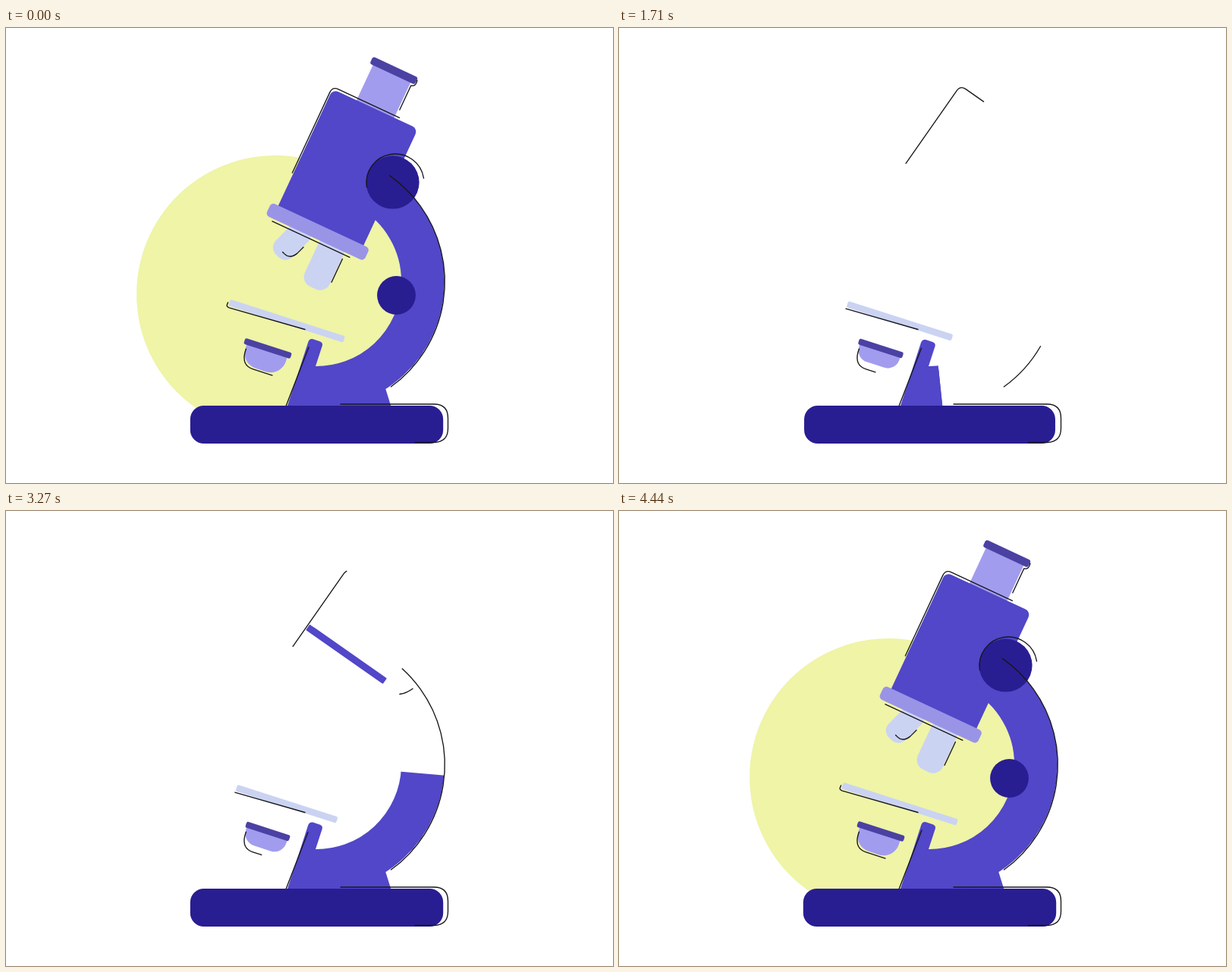
An HTML page with a canvas that plays this animation: 800x600 px, repeating every 5490 ms.

```html
<!DOCTYPE html>
<html lang="en">
<head>
<meta charset="utf-8">
<title>Microscope</title>
<style>
  html, body { margin: 0; height: 100%; overflow: hidden; background: #fff; }
  canvas { display: block; }
</style>
</head>
<body>
<canvas width="800" height="600"></canvas>
<script>
const ctx = document.querySelector('canvas').getContext('2d');
const LOOP = 5490, STEP = 30, BLANK = 2300;
const INDIGO = '#5147c8', NAVY = '#291d92', LILAC = '#a29cef',
      PLUM = '#4b41a3', COLLAR = '#9a94e6', PALE = '#cbd3f2', LIME = '#eff4a7';
const RAD = Math.PI / 180;
let time = 0;

const clamp = x => Math.min(1, Math.max(0, x));
const easeOut = p => 1 - (1 - p) ** 3;
const easeIn = p => p ** 3;
const easeInOut = p => p < .5 ? 2 * p * p : 1 - 2 * (1 - p) ** 2;
const backIn = p => p * p * (1.755 * p - .755);

// 0 = hidden, 1 = complete; parts leave before the blank pause and enter after it
function shown(enter, enterFor, leave, leaveFor, enterEase = easeOut, leaveEase = easeIn) {
  return time < BLANK
    ? 1 - leaveEase(clamp((time - leave) / leaveFor))
    : enterEase(clamp((time - enter) / enterFor));
}

function group(x, y, degrees, draw) {
  ctx.save();
  ctx.translate(x, y);
  ctx.rotate(degrees * RAD);
  draw();
  ctx.restore();
}

function box(color, x, y, w, h, r) {
  if (w <= 0 || h <= 0) return;
  ctx.fillStyle = color;
  ctx.beginPath();
  ctx.roundRect(x, y, w, h, r);
  ctx.fill();
}

// Rounded box scaled about its own centre, corners included
function scaledBox(color, cx, cy, w, h, r, sx, sy) {
  if (sx <= 0 || sy <= 0) return;
  ctx.save();
  ctx.translate(cx, cy);
  ctx.scale(sx, sy);
  box(color, -w / 2, -h / 2, w, h, r);
  ctx.restore();
}

function disc(color, x, y, r) {
  if (r <= 0) return;
  ctx.fillStyle = color;
  ctx.beginPath();
  ctx.arc(x, y, r, 0, 2 * Math.PI);
  ctx.fill();
}

function line(path, length, amount) {
  if (amount <= 0) return;
  ctx.setLineDash(amount < 1 ? [length * amount, 2000] : []);
  ctx.stroke(new Path2D(path));
  ctx.setLineDash([]);
}

// Arc drawn counter-clockwise from one angle over a sweep, in degrees
function arcLine(x, y, r, from, sweep) {
  if (sweep <= 0) return;
  ctx.beginPath();
  ctx.arc(x, y, r, from * RAD, (from - sweep) * RAD, true);
  ctx.stroke();
}

function drawBackdrop() {
  const size = shown(3930, 540, 1065, 598, easeOut, backIn);
  if (size <= 0) return;
  ctx.save();
  ctx.translate(355, 351);
  ctx.scale(size, size);
  ctx.fillStyle = LIME;
  ctx.beginPath();
  ctx.arc(0, 0, 183, 1.236, .292 + 2 * Math.PI);
  ctx.arc(54, -17, 141, .52, 1.3);
  ctx.fill();
  ctx.restore();
}

function drawTray() {
  const tray = shown(3030, 480, 1590, 270);
  group(370, 386.3, 17.8, () => scaledBox(PALE, 0, 0, 159, 8.8, 2.5, tray, 1));
  line('M394 397.5L294 368.8Q290.5 367.5 291.3 365L292.5 362', 113, shown(3060, 450, 1590, 240));
}

function drawCondenser() {
  const bowl = shown(3090, 450, 1560, 240), cap = shown(3000, 450, 1620, 240);
  group(345, 422.5, 18, () => {
    box(LILAC, -28, 0, 56, 30 * bowl, [0, 0, 21 * bowl, 21 * bowl]);
    scaledBox(PLUM, 0, 0, 64.5, 8.2, 2.5, cap, 1);
    line('M-27 9.5V14Q-26 32 -10 32H16.7', 60, shown(3120, 420, 1560, 240));
  });
}

function drawArm() {
  const sweep = shown(2970, 550, 1500, 270, easeInOut, easeInOut);
  const stem = shown(2790, 560, 1650, 300);
  ctx.save();
  ctx.beginPath();
  ctx.rect(0, 0, 800, 499);
  ctx.clip();

  if (stem > 0) {
    const slide = 95 * (1 - stem);
    ctx.fillStyle = INDIGO;
    ctx.fill(shifted('M371 498L398.3 414Q400 409.300 404.5 410.300L413.500 413.200Q418 415 416.800 419L391 498Z', -slide / 3, slide));
  }
  if (sweep > 0) {
    ctx.beginPath();
    ctx.moveTo(409, 334);
    ctx.arc(409, 334, 260, 100 * RAD, (100 - 162 * sweep) * RAD, true);
    ctx.clip();
    ctx.fillStyle = ctx.strokeStyle = INDIGO;
    ctx.fill(new Path2D('M408 446L500 475L507.500 499H390Z'));
    ctx.lineWidth = 57;
    ctx.beginPath();
    ctx.arc(409, 334, 140.5, 92 * RAD, -62 * RAD, true);
    ctx.stroke();
  }
  ctx.restore();
}

function shifted(path, x, y) {
  const result = new Path2D();
  result.addPath(new Path2D(path), new DOMMatrix().translate(x, y));
  return result;
}

function drawHead(turn) {
  const eyepiece = shown(3565, 345, 1200, 270);
  const lens = shown(3750, 400, 1110, 270);
  const sideLens = shown(3930, 390, 1065, 240);
  const collar = shown(3590, 320, 1200, 270);
  const body = shown(3260, 580, 1307, 360);

  group(448.5, 188.8, 35 - 10 * turn, () => {
    if (eyepiece > 0) {
      const drop = 63 * (1 - eyepiece);
      box(LILAC, -27.3, -142 + drop, 54.7, 60, 0);
      box(PLUM, -32, -152 + drop, 65.5, 10.5, 3);
    }
    if (lens > 0) box(PALE, 7, 88 - 61 * (1 - lens), 36.3, 70, 14);
    if (sideLens > 0) group(-21.7, 102, 20, () =>
      box(PALE, -15.5, -16 - 48 * (1 - sideLens), 31, 56, 13));
    scaledBox(INDIGO, 0, 0, 124, 181, 8, body > 0 ? 1 : 0, body);
    scaledBox(COLLAR, -.5, 88.3, 143, 18.6, 5, collar, 1);

    line('M-63.6 32V-85Q-63.600 -93.500 -55 -93.500H33.700', 211, shown(3180, 360, 1560, 240));
    line('M29.500 -103V-138.300L32.500 -139.500Q35.500 -142 34 -148', 48, shown(3550, 330, 1200, 240));
    line('M-60.500 101H52', 113, shown(3620, 290, 1170, 240));
    line('M44.300 107V141', 34, shown(3680, 240, 1110, 240));
    group(-21.7, 102, 20, () =>
      line('M16.400 7.500V19Q15 31.500 5 31.500H1.600', 32, shown(3885, 390, 1065, 210)));
  });
}

function drawKnobs(turn) {
  disc(NAVY, 509.6, 203.6, 35 * shown(3555, 350, 1200, 270));
  disc(NAVY, 514.5, 352.5, 25.4 * shown(3725, 400, 1080, 300));
  arcLine(513, 204, 38, 81 - 90 * turn, 180 * shown(3240, 540, 1320, 315));
}

function drawBase() {
  const base = shown(2640, 615, 1630, 410);
  scaledBox(NAVY, 409.5, 523, 333.4, 50, 18, base, 1);
  line('M539 546.500H564Q582.500 546 582.500 528V514.500Q582.500 496 564 496H441', 215, shown(2640, 315, 1770, 260));
}

function draw() {
  ctx.fillStyle = '#fff';
  ctx.fillRect(0, 0, 800, 600);
  ctx.strokeStyle = '#17171c';
  ctx.lineWidth = 1.35;
  ctx.lineCap = 'round';

  const turn = shown(3765, 350, 1080, 300);
  drawBackdrop();
  drawTray();
  drawCondenser();
  drawArm();
  drawHead(turn);
  drawKnobs(turn);
  arcLine(407.5, 334.5, 170.8, 54.2, 109.2 * shown(2828, 540, 1530, 270, easeInOut, easeInOut));
  line('M369 498.500L399 421', 83, shown(3000, 400, 1650, 240));
  drawBase();
}

function tick(now) {
  time = Math.floor(now % LOOP / STEP) * STEP;
  draw();
  requestAnimationFrame(tick);
}
requestAnimationFrame(tick);
</script>
</body>
</html>
```
